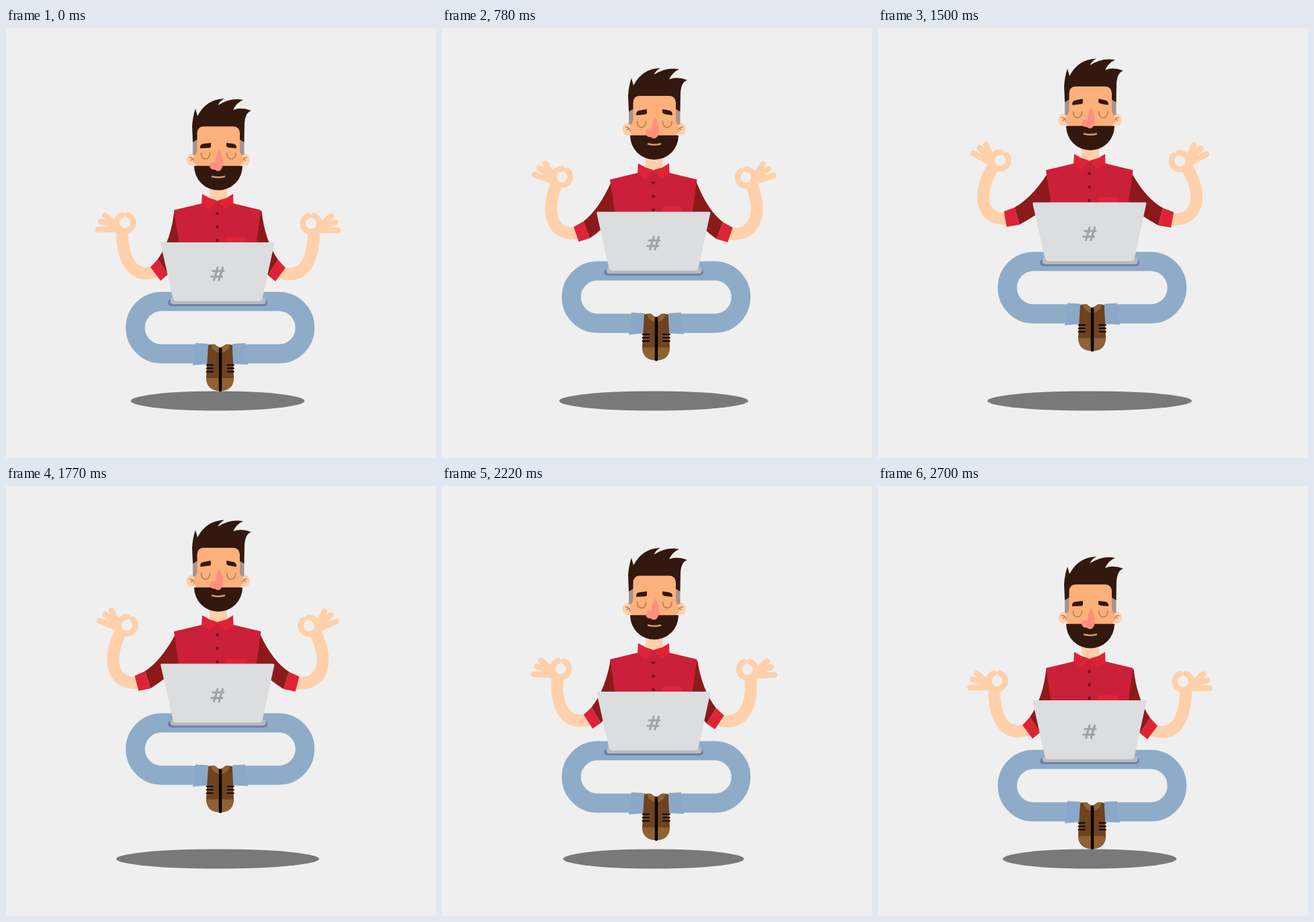
Animation of 640x640 px, one loop 2.76 s. Source, as an HTML page with a canvas:

```html
<!DOCTYPE html>
<html lang="en">
<head>
<meta charset="utf-8">
<title>Levitating coder</title>
<style>
  html, body { margin: 0; width: 100%; height: 100%; overflow: hidden; background: #efefef; }
  canvas { display: block; width: 100vw; height: 100vh; }
</style>
</head>
<body>
<canvas id="stage" width="640" height="640"></canvas>
<script>
const ctx = document.getElementById('stage').getContext('2d');
const LOOP = 2760, STEP = 30, HALF = 1350;

const color = {
  bg: '#efefef', skin: '#ffd0a9', face: '#fcb07b', hair: '#33180f', temple: '#a59490',
  nose: '#ff8f7c', line: '#b87f56', mouth: '#d99c6c', shirt: '#cb2039', trim: '#df2336',
  sleeve: '#8c1a1b', button: '#77101a', pants: '#8eacc8', hem: '#8aa9c8', shadow: '#797979',
  lid: '#dbdddf', deck: '#b9bcbe', base: '#6f7fae', mark: '#a1a2a4',
  shoe: '#6f4220', toe: '#8f6236', black: '#0c0705'
};

// Easing curve through (0,0), (x1,0), (x2,1), (1,1)
function ease(x, x1, x2) {
  let lo = 0, hi = 1;
  for (let i = 0; i < 24; i++) {
    const s = (lo + hi) / 2, r = 1 - s;
    if (3 * r * r * s * x1 + 3 * r * s * s * x2 + s * s * s < x) lo = s; else hi = s;
  }
  return lo * lo * (3 - 2 * lo);
}

// Rises to 1 in the first half of the loop and returns to 0 in the second
function swing(t, up, down) {
  return t < HALF ? ease(t / HALF, ...up) : 1 - ease((t - HALF) / HALF, ...down);
}

function fill(path, style) {
  ctx.fillStyle = style;
  ctx.fill(new Path2D(path));
}

function stroke(path, style, width, cap = 'round') {
  ctx.strokeStyle = style;
  ctx.lineWidth = width;
  ctx.lineCap = cap;
  ctx.stroke(new Path2D(path));
}

function disc(x, y, rx, ry, style) {
  ctx.fillStyle = style;
  ctx.beginPath();
  ctx.ellipse(x, y, rx, ry, 0, 0, Math.PI * 2);
  ctx.fill();
}

function box(x, y, w, h, r, style) {
  ctx.fillStyle = style;
  ctx.beginPath();
  ctx.roundRect(x, y, w, h, r);
  ctx.fill();
}

// Draws a part moved by dy and turned about (x, y)
function shifted(dy, part, angle = 0, x = 0, y = 0) {
  ctx.save();
  ctx.translate(x, y + dy);
  ctx.rotate(angle);
  ctx.translate(-x, -y);
  part();
  ctx.restore();
}

function hand(x, y, angle) {
  ctx.save();
  ctx.translate(x, y);
  ctx.rotate(angle);
  stroke('M-30 -11L-14 2M-36 -2L-14 5M-40 10L-10 10', color.skin, 8.6);
  stroke('M-16 3L-9 10', color.skin, 10);
  ctx.lineWidth = 8.5;
  ctx.beginPath();
  ctx.arc(0, 0, 12.3, -Math.PI / 2 + 0.35, Math.PI * 1.5 - 0.35);
  ctx.stroke();
  ctx.restore();
}

// Left arm; tuck pulls the cuff towards the body as the arm lifts
function arm(p, tuck) {
  const bow = 8 * p * (1 - p);
  const mix = (x0, y0, x1, y1, dx, dy) => [x0 + (x1 - x0) * p + dx, y0 + (y1 - y0) * p + dy];
  const soft = (...a) => mix(...a, -bow, 0);
  const firm = (...a) => mix(...a, tuck * p, bow);

  const a = firm(215, 356, 187, 332), b = firm(226, 344, 203, 326);
  const c = firm(241, 367, 210, 352), d = firm(230, 376, 191, 355);
  const shoulder = mix(250.5, 271, 253, 275, 0, 0);
  const outer = firm(246, 315, 228, 313), inner = firm(250, 355, 235, 338);

  stroke(`M${soft(173, 302, 172, 265)}C${soft(173, 350, 148, 300)} ${soft(192, 376, 148, 351)} ${firm(226, 361, 199, 342)}`,
    color.skin, 18, 'butt');
  hand(...soft(177, 290, 182, 256), 29 * Math.PI / 180 * p ** 1.25);
  fill(`M${shoulder}Q${outer} ${b}L${c}Q${inner} 262 320L270 290Z`, color.sleeve);
  fill(`M${a}L${b}L${c}L${d}Z`, color.trim);
}

function arms(p) {
  arm(p, 0);
  ctx.save();
  ctx.translate(631, 1);
  ctx.scale(-1, 1);
  arm(p, 3.5);
  ctx.restore();
}

function legs() {
  stroke('M300 485H231.5A39 39 0 0 1 231.5 407H406A39 39 0 0 1 406 485H338', color.pants, 28.5, 'butt');
  fill('M282 469L302 470L300 500L278 502Z', color.hem);
  fill('M337 470L356 469L360 501L338 500Z', color.hem);

  fill('M301 472Q306 470 311 471Q315 475 319 476Q323 474 327 471Q332 470 337 472L339 520Q339 540 319 540Q298 540 298 520Z', color.shoe);
  fill('M298.3 521H339Q338 540 319 540Q299 540 298.3 521Z', color.toe);
  fill('M305 472Q308 470 311 471Q315 475 319 476Q323 474 327 471Q331 470 333 472Q330 482 319 484Q308 482 305 472Z', color.toe);
  stroke('M319 477.5V539', color.black, 4.6);
  for (const y of [501.5, 506.5, 511.5]) {
    stroke(`M298.5 ${y}H308M329.5 ${y}H339`, color.black, 1.9);
  }
}

function torso() {
  fill('M250 271L292 261L303 255H327L338 261L379.5 271L372 325H258Z', color.shirt);
  box(328, 311.5, 29, 14, 1, color.trim);
  fill('M303 232H329V252L315 258L303 252Z', color.skin);
  fill('M292 247L303 253L314.5 257L303 270.5L291 262Z', color.trim);
  fill('M338 247L328 253L314.5 257L327 270.5L338.5 262Z', color.trim);
  for (const y of [276, 296, 316]) disc(314.5, y, 2.4, 2.4, color.button);
}

// Facial features drift upwards as the head tilts back
function features(tilt) {
  shifted(-5.5 * tilt, () =>
    fill('M289 179Q288 172 296 172L305 171V177L303 178.5Z', color.hair), -0.1 * tilt, 297, 175);
  shifted(-5.5 * tilt, () =>
    fill('M328 171L337 172Q344 173 343 179L331 178L328 176Z', color.hair), 0.1 * tilt, 335.5, 175);
  shifted(-2 * tilt, () =>
    stroke('M290.5 186C290.5 198 303.5 198 303.5 186M328.5 186C328.5 198 342 198 342 186', color.line, 1.7));
  shifted(-4 * tilt, () => {
    stroke('M307 221Q316 223.5 325 221', color.mouth, 2.5);
    fill('M317.5 181Q312.5 189 311.5 200Q303 199 303 205.5Q304 211 311 211Q313 213 316 213Q321 212 322.5 205Q324 194 317.5 181Z', color.nose);
  });
}

function head(tilt) {
  disc(276, 196, 7.5, 9, color.skin);
  disc(355.5, 196, 7.5, 9, color.skin);
  stroke('M273 193Q279 192 280 199M275 197L278 195M358.5 193Q352.5 192 351.5 199M356.5 197L353.5 195', color.line, 1.5);
  box(280, 146, 72, 62, 10, color.face);
  fill('M278 168L284.5 165V183L282 189H278Z', color.temple);
  fill('M354.5 168L348 165V183L350 189H354.5Z', color.temple);
  fill('M278 170L277 146Q278 131 282 120L285 131Q298 106 325 105Q318 109 315.5 115Q334 103 353 107Q343 111 338 122Q350 117 365 123Q356 126 355 142L354.5 170L348 166V156Q347 146.5 338 146.5H294Q284.5 147 284.5 157V166Z', color.hair);
  fill('M280 205.3H352A36 36.2 0 0 1 280 205.3Z', color.hair);
  features(tilt);
}

function laptop() {
  box(241, 404, 148, 10, 5, color.base);
  box(245, 402, 141.5, 9, 4, color.deck);
  fill('M232 319H397.5Q399.8 319 399.3 321.5L381.5 403Q380.5 406.5 377 406.5H253Q249.5 406.5 248.6 403L230.3 321.5Q229.8 319 232 319Z', color.lid);
  stroke('M309.5 375L315 356.5M317 375L322.5 356.5M308 361.7H323.8M305.8 370H321.7', color.mark, 3.1);
}

function draw(t) {
  const lift = swing(t, [0.69, 0.27], [0.73, 0.37]);
  const reach = swing(t, [0.76, 0.306], [0.583, 0.32]);
  const spread = swing(t, [0.91, 0.3], [0.93, 0.3]);

  ctx.fillStyle = color.bg;
  ctx.fillRect(0, 0, 640, 640);
  disc(315, 555, 129.3 + 23 * spread, 14.6, color.shadow);

  shifted(-60 * lift, () => {
    legs();
    arms(reach);
    torso();
    head(lift);
    laptop();
  });
}

function tick() {
  const t = performance.now() % LOOP;
  draw(Math.min(Math.floor(t / STEP) * STEP, HALF * 2));
  requestAnimationFrame(tick);
}
tick();
</script>
</body>
</html>
```
